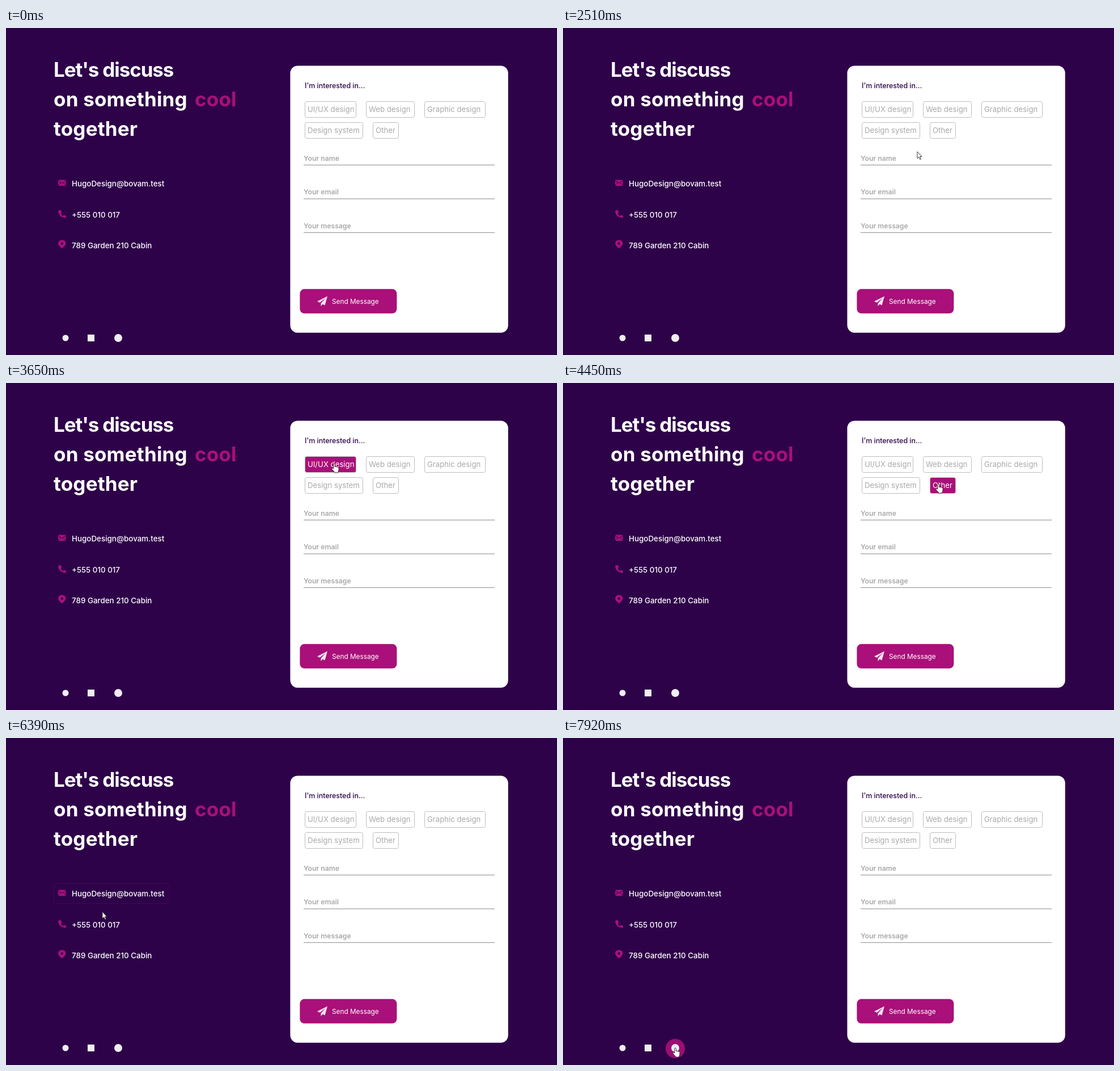
These frames come from a looping animation (972x576 px, 7990 ms). An HTML page:

```html
<!DOCTYPE html>
<html lang="en">
<head>
<meta charset="utf-8">
<title>Contact form</title>
<style>
  html, body { margin: 0; height: 100%; overflow: hidden; background: #2e0249; }
  svg { display: block; width: 100vw; height: 100vh; font-family: Inter, "Open Sans", sans-serif; }
  .title { font-size: 35px; font-weight: 700; letter-spacing: .2px; fill: #fff; }
  .info { font-size: 13.4px; font-weight: 500; fill: #fff; }
  .label { font-size: 12.2px; font-weight: 600; fill: #a9a9a9; }
  .chip { font-size: 13.2px; }
  .pink { fill: #a91079; }
</style>
</head>
<body>
<svg viewBox="0 0 972 576">
  <filter id="blur" x="-30%" y="-100%" width="160%" height="300%"><feGaussianBlur stdDeviation="9"/></filter>

  <g class="title">
    <text x="84" y="86" letter-spacing="0" style="letter-spacing:-1.1px">Let's discuss</text>
    <text x="84" y="138">on something</text>
    <text x="333" y="138" class="pink">cool</text>
    <text x="84" y="190">together</text>
  </g>

  <g id="rows"></g>
  <g class="pink">
    <rect x="92" y="267.5" width="13.5" height="10.5" rx="1.5"/>
    <path d="M92 269l6.7 4.3 6.8-4.3M92 277l4.6-4.6M105.5 277l-4.6-4.6" fill="none" stroke="#2e0249"/>
    <path d="M93 321.500l2.500-.7q1-.1 1.400.8l1.200 3q.3 1-.5 1.700l-1 1q1.500 2.700 4 4l1-1.200q.7-.8 1.700-.4l2 1q1 .5.700 1.500l-.6 1.700q-.4.7-1.200.6Q93 333 92 323Q92 322 93 321.500Z"/>
    <path fill-rule="evenodd" d="M98.700 388.500Q92 382.500 92 379.500a6.700 6.300 0 0 1 13.500 0Q105.500 382.500 98.700 388.500ZM98.700 377.500a2.100 2.100 0 1 0 .01 0Z"/>
  </g>

  <circle id="halo" cx="198" cy="547" r="17" class="pink"/>
  <g fill="#f1edf4">
    <circle cx="105" cy="546" r="5.5"/>
    <rect x="144" y="540" width="12" height="12"/>
    <circle cx="198" cy="546" r="7"/>
  </g>

  <rect x="501.4" y="66.4" width="384.4" height="470.4" rx="13" fill="#fff"/>
  <text x="527" y="105.5" font-size="12.4" font-weight="500" fill="#2e0249">I'm interested in...</text>
  <g id="chips"></g>
  <g id="fields"></g>

  <rect id="glow" x="518" y="462" width="172" height="43" rx="9" class="pink" filter="url(#blur)"/>
  <rect x="518.4" y="459.8" width="171" height="43" rx="8" class="pink"/>
  <path d="M567 472.5L549 481.5l4.5 2.2L564 475.5l-8.5 9.5v5l3.2-3.6 3.8 2Z" fill="#f6e4f0"/>
  <text x="575" y="485.5" font-size="11.8" fill="#fff">Send Message</text>

  <g id="cursor" fill="#fff" stroke="#222" stroke-width=".9" stroke-linejoin="round">
    <path id="arrow" d="M0 0V12L2.8 9.4 4.8 13.8 6.6 13 4.7 8.7H8Z"/>
    <path id="hand" d="M-1.3 9V1.3a1.3 1.3 0 0 1 2.6 0V6a1.2 1.2 0 0 1 2.4.2a1.2 1.2 0 0 1 2.3.4a1.1 1.1 0 0 1 2 .6V11q0 2-1.2 3.5V16H.3v-1.2L-4 10q-.9-1.5.4-2Q-2.6 7.6-1.3 9Z"/>
  </g>
</svg>
<script>
const LOOP = 7990, ENTER = 370, FADE = 160, SAMPLES = 16;
const WHITE = [255, 255, 255], PINK = [169, 16, 121], GREY = [169, 169, 169];
const $ = id => document.getElementById(id);
const mix = (a, b, k) => `rgb(${a.map((v, i) => Math.round(v + (b[i] - v) * k))})`;

function add(parent, tag, attrs, text = '') {
  const el = document.createElementNS('http://www.w3.org/2000/svg', tag);
  for (const key in attrs) el.setAttribute(key, attrs[key]);
  el.textContent = text;
  return $(parent).appendChild(el);
}

// Key points of the pointer's path: time, x, y
const path = [
  [ENTER, 925, 562], [710, 762, 453], [910, 762, 453], [1520, 648, 478], [1850, 634, 484],
  [2050, 634, 484], [2510, 625, 218], [2850, 600, 178], [3650, 579, 142], [3950, 640, 142],
  [4450, 662, 178], [4800, 730, 172], [5250, 780, 151], [5550, 660, 212], [6120, 182, 276],
  [6390, 170, 306], [6920, 164, 374], [7720, 191, 531], [7920, 198, 546]
];

function slope(i, axis) {
  const [a, b, c] = [path[i - 1], path[i], path[i + 1]];
  if (!a || !c) return 0;
  const before = (b[axis] - a[axis]) / (b[0] - a[0]);
  const after = (c[axis] - b[axis]) / (c[0] - b[0]);
  return before * after > 0 ? 2 * before * after / (before + after) : 0;
}

// Monotone cubic through the key points
function pointer(t) {
  const next = path.findIndex(p => p[0] > t);
  if (next < 1) return path.at(next).slice(1);
  const a = path[next - 1], b = path[next], span = b[0] - a[0];
  const k = (t - a[0]) / span, rest = 1 - k;
  return [1, 2].map(axis =>
    a[axis] + (b[axis] - a[axis]) * k * k * (3 - 2 * k) +
    span * k * rest * (slope(next - 1, axis) * rest - slope(next, axis) * k));
}

const zones = [];
const zone = (x, y, w, h, paint, link = true) => zones.push({ x, y, w, h, paint, link });

function over(z, t) {
  if (t < ENTER) return false;
  const [x, y] = pointer(t);
  return x >= z.x && x <= z.x + z.w && y >= z.y && y <= z.y + z.h;
}

// Linear fade: share of the last FADE ms spent inside the zone
function level(z, t) {
  let hits = 0;
  for (let i = 0; i < SAMPLES; i++) hits += over(z, t - i * FADE / SAMPLES);
  return hits / SAMPLES;
}

function chip(name, x, y, w) {
  const box = add('chips', 'rect', { x: x + .5, y: y + .5, width: w - 1, height: 28, rx: 3, stroke: '#bdbdbd' });
  const text = add('chips', 'text', { x: x + 5, y: y + 19, class: 'chip' }, name);
  zone(x, y, w, 29, k => {
    box.setAttribute('fill', mix(WHITE, PINK, k));
    text.setAttribute('fill', mix(GREY, WHITE, k));
  });
}

const chipRows = [
  { 'UI/UX design': 91, 'Web design': 86, 'Graphic design': 108 },
  { 'Design system': 103, 'Other': 46 }
];
chipRows.forEach((row, i) => {
  let x = 527;
  for (const [name, w] of Object.entries(row)) {
    chip(name, x, 129 + 37 * i, w);
    x += w + 17;
  }
});

['name', 'email', 'message'].forEach((name, i) => {
  const y = 233.5 + i * 59.5;
  add('fields', 'text', { x: 525, y, class: 'label' }, 'Your ' + name);
  add('fields', 'rect', { x: 525, y: y + 7.3, width: 337, height: 1.2, fill: '#9c9c9c' });
});

['HugoDesign@bovam.test', '+555 010 017', '789 Garden 210 Cabin'].forEach((line, i) => {
  const y = 256 + i * 54.6;
  const text = add('rows', 'text', { x: 116, y: y + 23, class: 'info' }, line);
  const w = text.getComputedTextLength() + 41;
  const box = add('rows', 'rect', { x: 84.5, y: y + .5, width: w - 1, height: 35, rx: 4, fill: 'none', stroke: '#a91079' });
  zone(84, y, w, 36, k => box.setAttribute('opacity', k), false);
});

zone(518, 460, 172, 43, k => $('glow').setAttribute('opacity', k * .75));
zone(181, 530, 34, 34, k => $('halo').setAttribute('opacity', k * .9));

function draw(now) {
  const t = now % LOOP;
  for (const z of zones) z.paint(level(z, t));
  const link = zones.some(z => z.link && over(z, t));
  $('cursor').setAttribute('transform', `translate(${pointer(t)})`);
  $('cursor').setAttribute('visibility', t < ENTER ? 'hidden' : 'visible');
  $('arrow').setAttribute('display', link ? 'none' : 'inline');
  $('hand').setAttribute('display', link ? 'inline' : 'none');
}

const start = performance.now();
function tick() {
  draw(performance.now() - start);
  requestAnimationFrame(tick);
}
tick();
</script>
</body>
</html>
```
